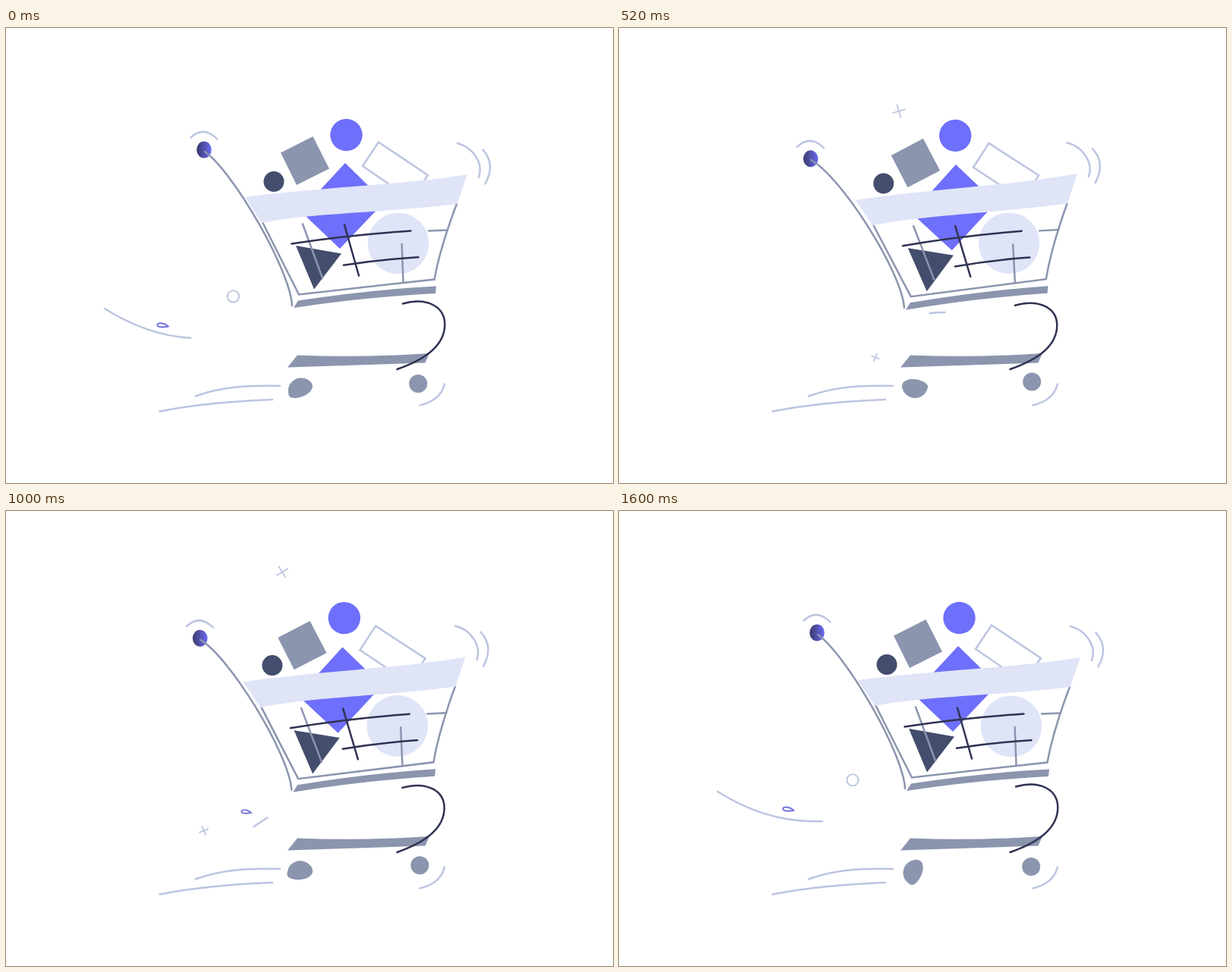
Write an HTML page that moves like this. It is 800 px wide and 600 px high and loops after 1.64 s.

```html
<!DOCTYPE html>
<html lang="en">
<head>
<meta charset="utf-8">
<title>Rolling cart</title>
<style>
  html, body { margin: 0; width: 100%; height: 100%; overflow: hidden; background: #fff; }
  svg { display: block; width: 100vw; height: 100vh; }
  .line { fill: none; stroke-width: 2.5; stroke-linecap: round; stroke-linejoin: miter; }
  .pale { stroke: #bcc5e0; }
  .gray { stroke: #8b95ae; }
  .ink { stroke: #2f3352; }
  .fine { stroke-width: 2; }
  .thin { stroke-width: 1.8; stroke-linecap: butt; }
</style>
</head>
<body>
<svg viewBox="0 0 800 600">
  <defs>
    <linearGradient id="shade">
      <stop offset="0.1" stop-color="#3f3f78"/>
      <stop offset="1" stop-color="#6a6af2"/>
    </linearGradient>
  </defs>

  <g class="line pale">
    <path d="M250 485.5C285 472.5 320 471 361 472"/>
    <path d="M202.5 505.5C250 496 300 492 351 490"/>
    <path d="M545.5 497.5Q573 491 578 469.5"/>
    <path class="trail" pathLength="1" d="M318 402C250 418 190 408 130 370"/>
    <path class="trail" pathLength="1" d="M430 375C400 374 370 386 327 416"/>
    <path class="trail" pathLength="1" d="M332 453C288 416 220 403 144 407.5"/>
  </g>

  <g id="bits">
    <circle class="line pale fine" r="8"/>
    <path class="line fine" stroke="#7272dc" d="M7 1C3 -3 -5 -4.5 -7 -1.5C-7.5 2.5 0 2.5 7 1Z"/>
    <path class="line pale thin" d="M-9.5 0H9.5M0 -9.5V9.5"/>
    <path class="line pale thin" d="M-9.5 0H9.5M0 -9.5V9.5"/>
    <path class="line pale thin" d="M-6.5 0H6.5M0 -6.5V6.5"/>
  </g>

  <path fill="#8b95ae" d="M384 431.5Q470 435 558 429L552.5 441.5L371 447.5Z"/>
  <path id="hook" class="line ink"/>
  <path id="rear" fill="#8b95ae" d="M15.5 -2C15.5 5 4 13.5 -8 13.5C-16 13.5 -16.5 10 -16.5 2C-16.5 -4 -10 -12.5 -1 -13C7 -13.5 15.5 -9 15.5 -2Z"/>
  <circle id="front" r="12" fill="#8b95ae"/>

  <g id="basket">
    <g id="grip">
      <ellipse cx="261" cy="160.5" rx="9.8" ry="11" fill="url(#shade)"/>
      <path class="line pale" d="M243.5 144.5Q261 128.5 278.500 146.5"/>
    </g>
    <path id="handle" class="line gray"/>
    <g id="goods">
      <circle cx="353" cy="202.5" r="13.5" fill="#434d6c"/>
      <path fill="#8b95ae" d="M362 164.5L404.5 143L426 185.5L383 207Z"/>
      <circle cx="448.5" cy="141" r="21.2" fill="#6e6ffb"/>
      <path class="line pale" d="M491 150.5L556 194L534 226L470 182Z"/>
      <path fill="#6e6ffb" d="M447 178L499 229L440 291L388 241.5Z"/>
      <circle cx="517" cy="284" r="40.3" fill="#e0e4f7"/>
      <path fill="#434d6c" d="M382 287L442 297.5L406 344.5Z"/>
    </g>
    <path class="line gray" d="M338 256L386 351.5L564.5 331.5Q572 290 594 232"/>
    <path class="line gray" d="M391 258.5L417 329.5M521.7 285L523.5 335M557 267.5L582 266.5"/>
    <path class="line ink" d="M376.5 284.5Q450 273 533.5 267.5M445 312.7Q495 305 543.5 302.3M446 259.5L465 326.5"/>
    <path fill="#e0e4f7" d="M315 223C410 210 525 207 608 193L594.5 232C510 243 400 244 337 257Z"/>
    <path fill="#8b95ae" d="M385 359.5Q480 345 567 340.5L566 350Q470 355 379 369Z"/>
    <path class="line pale" d="M595 152C615 157 630 178 623 197M628.5 160.5Q646 180 631.5 205.5"/>
  </g>
</svg>

<script>
const LOOP = 1640, STEP = 40, SWAY = 1600, SHAKE = 400;
const $ = id => document.getElementById(id);
const put = (el, s) => el.setAttribute("transform", s);
const show = (el, on) => { el.style.display = on ? "" : "none"; };
const clamp = v => Math.min(Math.max(v, 0), 1);
const age = (t, start) => (t - start + LOOP) % LOOP;

const steady = u => u;
const speedUp = u => u * u;
const lateRush = u => (u + 3 * u ** 4) / 4;

// Bits fly from (x, y) by (dx, dy); bend curves the way, spin turns them
const bits = [
  { start: 1240, time: 800, x: 344, y: 356.5, dx: -178, dy: -43, ease: speedUp, bend: 2 },
  { start: 920, time: 920, x: 322, y: 397, dx: -242, dy: -20, ease: lateRush, bend: 2 },
  { start: 440, time: 400, x: 416, y: 119.5, dx: -236, dy: -68, ease: steady, bend: 1.2, tilt: 10, spin: .56 },
  { start: 920, time: 400, x: 428, y: 89, dx: -320, dy: -59, ease: steady, bend: 1.2, tilt: 4, spin: .56 },
  { start: 440, time: 760, x: 339.5, y: 434.5, dx: -145, dy: -24, ease: speedUp, bend: 1, tilt: 24, spin: .6 }
];

// Trails: time for the head, and for the tail that chases it
const trails = [
  { start: 1320, head: 240, tail: 440 },
  { start: 440, head: 440, tail: 600 },
  { start: 80, head: 120, tail: 320 }
];

const bitEls = [...$("bits").children];
const goods = [...$("goods").children];
const trailEls = [...document.querySelectorAll(".trail")];

// Basket tilt: quick swing back, slower return
function tiltAt(t) {
  const u = t % SHAKE / SHAKE, peak = .3;
  return u < peak
    ? (1 - Math.cos(Math.PI * u / peak)) / 2
    : ((1 - u) / (1 - peak)) ** 1.4;
}

function drawCart(t) {
  const p = tiltAt(t), right = 578.3 - p;

  put($("basket"), `rotate(${-.945 * p} 548 435)`);
  put($("grip"), `translate(${-4 * p} ${7 * p})`);
  $("handle").setAttribute("d",
    `M${262 - 4.5 * p} ${163 + 6.3 * p}C${300 - 2 * p} ${190 + 3 * p} 375 320 377 366`);
  $("hook").setAttribute("d",
    `M${523 - p} ${363.5 + 2.2 * p}C${556 - p} ${354.5 + 2 * p} ${right} ${368 + 2 * p} ${right} ${391 + p}` +
    `C${right} 418 553 437 515.5 450`);

  // Goods slide loosely: flat ones against the round ones
  const sway = Math.sin(2 * Math.PI * t / SWAY), lift = Math.sin(Math.PI * t / SWAY) ** 2;
  for (const el of goods) {
    const round = el.tagName === "circle";
    put(el, `translate(${(round ? -.5 : 1.3) * sway} ${(round ? -1.1 : .6) * lift})`);
  }

  put($("rear"), `translate(388.5 474.5) rotate(${5 * 360 * t / LOOP})`);
  const a = (135 - 225 * p ** .6) * Math.PI / 180;
  put($("front"), `translate(${544.2 + 1.4 * Math.cos(a)} ${468 + 1.4 * Math.sin(a)})`);
}

function drawBit(el, b, t) {
  const ms = age(t, b.start), s = b.ease(clamp(ms / b.time));
  const size = clamp(ms / 80) * (.9 + .25 * s);
  const angle = (b.tilt || 0) + (b.spin || 0) * b.dx * s;
  show(el, ms > 0 && ms <= b.time);
  put(el, `translate(${b.x + b.dx * s} ${b.y + b.dy * s ** b.bend}) rotate(${angle}) scale(${size})`);
}

function drawTrail(el, { start, head, tail }, t) {
  const ms = age(t, start), from = clamp(ms / tail) ** 3, len = clamp(ms / head) - from;
  show(el, len > .002);
  el.setAttribute("stroke-dasharray", `${len} 3`);
  el.setAttribute("stroke-dashoffset", -from);
}

function draw(t) {
  drawCart(t);
  bits.forEach((b, i) => drawBit(bitEls[i], b, t));
  trails.forEach((r, i) => drawTrail(trailEls[i], r, t));
}

const begin = performance.now();
function tick() {
  const t = (performance.now() - begin) % LOOP;
  draw(Math.floor(t / STEP) * STEP);
  requestAnimationFrame(tick);
}
tick();
</script>
</body>
</html>
```
